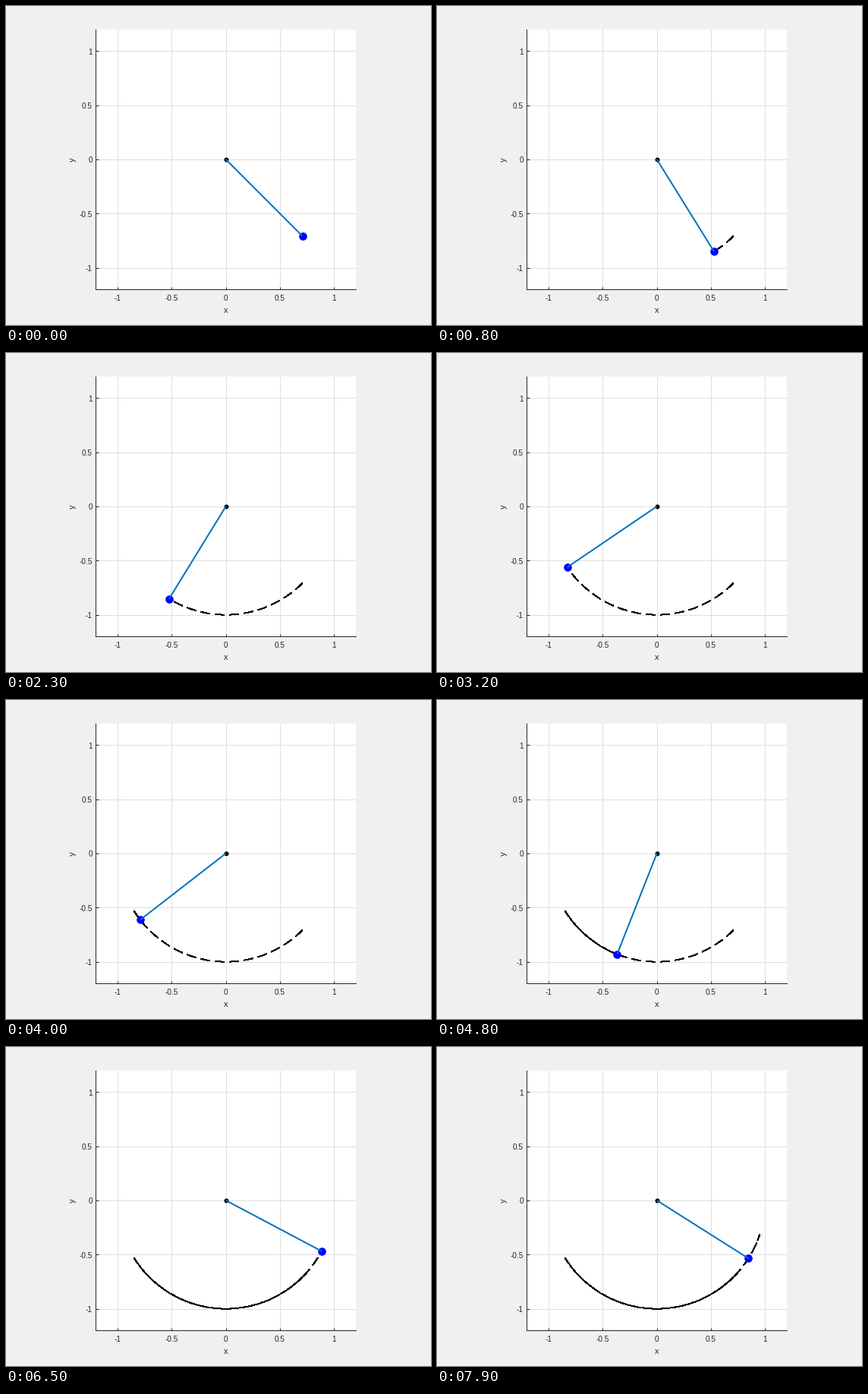
A matplotlib script that plays this animation: 560 by 420 pixels, repeating every 8000 ms.

```python
import matplotlib.pyplot as plt
import numpy as np
from matplotlib.animation import FuncAnimation

W, H, DPI = 560, 420, 100
FRAMES, INTERVAL = 80, 100
LEFT, BOTTOM, SIDE = 118.4, 46.7, 342.6
UNIT = SIDE / 2.4
CX, CY = LEFT + SIDE / 2, H - BOTTOM - SIDE / 2
INK = "#262626"

# Pendulum in units of one frame: gravity, push along the motion, first speed
GRAVITY, PUSH, SPEED = 0.0088, 0.00085, -0.0014
SUBSTEPS = 50

plt.rcParams["font.family"] = "Liberation Sans"
plt.rcParams["path.simplify"] = False


def px(n):
    """Pixels to points."""
    return n * 72 / DPI


def swing():
    """Angle of the rod in every frame."""
    angle, speed, dt = np.pi / 4, SPEED, 1 / SUBSTEPS
    for _ in range(FRAMES):
        yield angle
        for _ in range(SUBSTEPS):
            speed += (PUSH * np.sign(speed) - GRAVITY * np.sin(angle)) * dt
            angle += speed * dt


theta = np.array(list(swing()))
xs, ys = np.sin(theta), -np.cos(theta)

fig = plt.figure(figsize=(W / DPI, H / DPI), dpi=DPI, facecolor="#f0f0f0")
ax = fig.add_axes([LEFT / W, BOTTOM / H, SIDE / W, SIDE / H])
ax.set(xlim=(-1.2, 1.2), ylim=(-1.2, 1.2))
ax.set_axisbelow(True)
ax.grid(color="#dedede", lw=px(1))
ax.spines[["top", "right"]].set_visible(False)
ax.spines[["left", "bottom"]].set(color=INK, lw=px(1))

ticks = np.arange(-1, 1.5, 0.5)
ax.set_xticks(ticks)
ax.set_yticks(ticks)
ax.tick_params(direction="in", length=px(3.5), width=px(1), color=INK,
               labelbottom=False, labelleft=False)


def label(x, y, text, size=10, **kw):
    kw = {"ha": "center", "va": "baseline", **kw}
    fig.text(x / W, 1 - y / H, text, fontsize=px(size), color=INK, **kw)


for v in ticks:
    label(CX + v * UNIT, 388.5, f"{v:g}")
    label(114, CY + 4.5 - v * UNIT, f"{v:g}", ha="right")
label(CX, 403.5, "x", 11)
label(87.5, CY + 0.5, "y", 11, va="center", rotation=90)

trace, = ax.plot([], [], color="black", lw=px(1), ls=(0, (12.5, 6)),
                 dash_capstyle="butt", antialiased=False, zorder=3)
ax.plot(0, 0, "o", color="black", ms=px(6), mew=0, zorder=4)
bob, = ax.plot([], [], "o", color="#0000ff", ms=px(10.6), mew=0, zorder=4)
rod, = ax.plot([], [], color="#0072bd", lw=px(2), solid_capstyle="butt",
               zorder=5)


def draw(i):
    trace.set_data(xs[:i + 1], ys[:i + 1])
    bob.set_data([xs[i]], [ys[i]])
    rod.set_data([0, xs[i]], [0, ys[i]])
    return trace, bob, rod


anim = FuncAnimation(fig, draw, frames=FRAMES, interval=INTERVAL,
                     repeat=True, repeat_delay=0)
plt.show()
```
